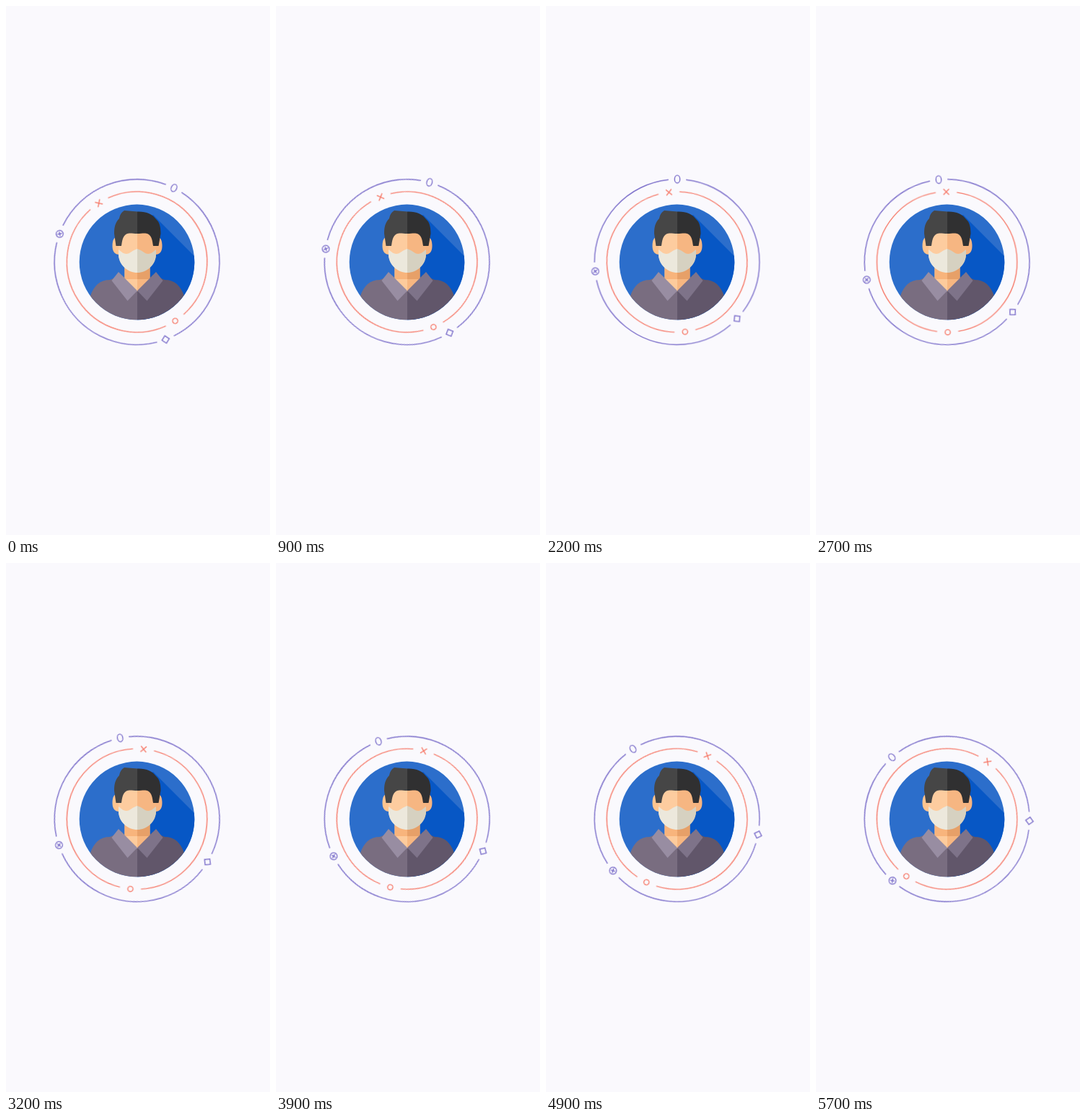
An HTML page that plays this animation: 366 px wide and 732 px high, repeating every 5.8 s.

```html
<!DOCTYPE html>
<html lang="en">
<head>
<meta charset="utf-8">
<title>Avatar with orbiting rings</title>
<style>
  html, body { margin: 0; width: 100%; height: 100%; overflow: hidden; background: #faf9fd; }
  svg { display: block; width: 100vw; height: 100vh; }
  .ring { fill: none; stroke-width: 1.45; animation: 5800ms steps(58, end) infinite; }
  .outer { stroke: #8074cc; animation-name: outer; }
  .inner { stroke: #f67d6d; animation-name: inner; }
  /* 12 degrees per second in opposite directions */
  @keyframes outer { from { transform: rotate(26.6deg); } to { transform: rotate(-43deg); } }
  @keyframes inner { from { transform: rotate(-33deg); } to { transform: rotate(36.6deg); } }
</style>
</head>
<body>
<svg viewBox="0 0 366 732">
  <defs>
    <clipPath id="disc"><circle cx="181.5" cy="354.4" r="79.8"/></clipPath>
  </defs>

  <g clip-path="url(#disc)">
    <path fill="#2c6ecb" d="M100 273h164v164h-164z"/>
    <path fill="#0757c5" d="M182 300L204 289L264 349V437H182z"/>

    <!-- ears -->
    <path fill="#fdc590" d="M156 319C150 319 147.500 324 147.500 332S151 344 157 344z"/>
    <path fill="#f6b480" d="M208 319C214 319 216.500 324 216.500 332S213 344 207 344z"/>

    <!-- shirt -->
    <path fill="#796d80" d="M110 440L117 401C122 387 130 379 144 379L160 372L182 392V440z"/>
    <path fill="#61566a" d="M254 440L247 401C242 387 234 379 220 379L204 372L182 392V440z"/>

    <!-- neck -->
    <path fill="#fdcb9c" d="M164.500 360H182V395L164.500 378z"/>
    <path fill="#f7b781" d="M199.500 360H182V395L199.500 378z"/>
    <path fill="#f8b47c" d="M164.500 360H182V378H164.500z"/>
    <path fill="#e7a068" d="M199.500 360H182V378H199.500z"/>

    <!-- collar -->
    <path fill="#988da2" d="M156 368L182 394L168.500 408L146.500 380z"/>
    <path fill="#7e7389" d="M208 368L182 394L195.500 408L217.500 380z"/>

    <!-- face -->
    <path fill="#fdcc9f" d="M182 308H160L156 330V345C158 360 170 368 182 368z"/>
    <path fill="#f6b682" d="M182 308H204L208 330V345C206 360 194 368 182 368z"/>

    <!-- mask -->
    <path fill="#ece8dc" d="M182 336C175 338 172 343 167 343C162 343 159 339 156 337V345C157 359 169 369 182 369z"/>
    <path fill="#d6d1c1" d="M182 336C189 338 192 343 197 343C202 343 205 339 208 337V345C207 359 195 369 182 369z"/>

    <!-- hair -->
    <path fill="#464646" d="M182 284.500L164 283C159 286 158 290 157 294C151 300 150 307 150 315L152.500 332H160C161 325 162 318 167 315.500C171 313.500 176 315 182 315z"/>
    <path fill="#303031" d="M182 284.500C194 284 203 288 208 295C213 299 214.500 306 214.500 315L211.500 332H204C203 325 202 318 197 315.500C193 313.500 188 315 182 315z"/>
  </g>

  <g transform="translate(181.600 354.200)">
    <g class="ring outer">
      <circle r="114.400" pathLength="360" transform="rotate(-90)"
        stroke-dasharray="0 6.200 120.700 12.400 117.800 12.400 84.300 6.200"/>
      <ellipse cy="-114.600" rx="3.700" ry="5.300"/>
      <rect x="-3.700" y="-3.700" width="7.400" height="7.400"
        transform="rotate(133.100) translate(0 -114.400) rotate(-127.300)"/>
      <g transform="rotate(263.300) translate(0 -114) rotate(148.100)">
        <circle r="4.800"/>
        <path d="M-3 0H3M0-3V3"/>
      </g>
    </g>
    <g class="ring inner">
      <circle r="97.200" pathLength="360" transform="rotate(-90)"
        stroke-dasharray="0 8.700 162.600 17.400 162.600 8.700"/>
      <path d="M-3.900-100.900l7.800 7.800m0-7.800l-7.800 7.800"/>
      <circle cy="97.200" r="3.600"/>
    </g>
  </g>
</svg>
</body>
</html>
```
